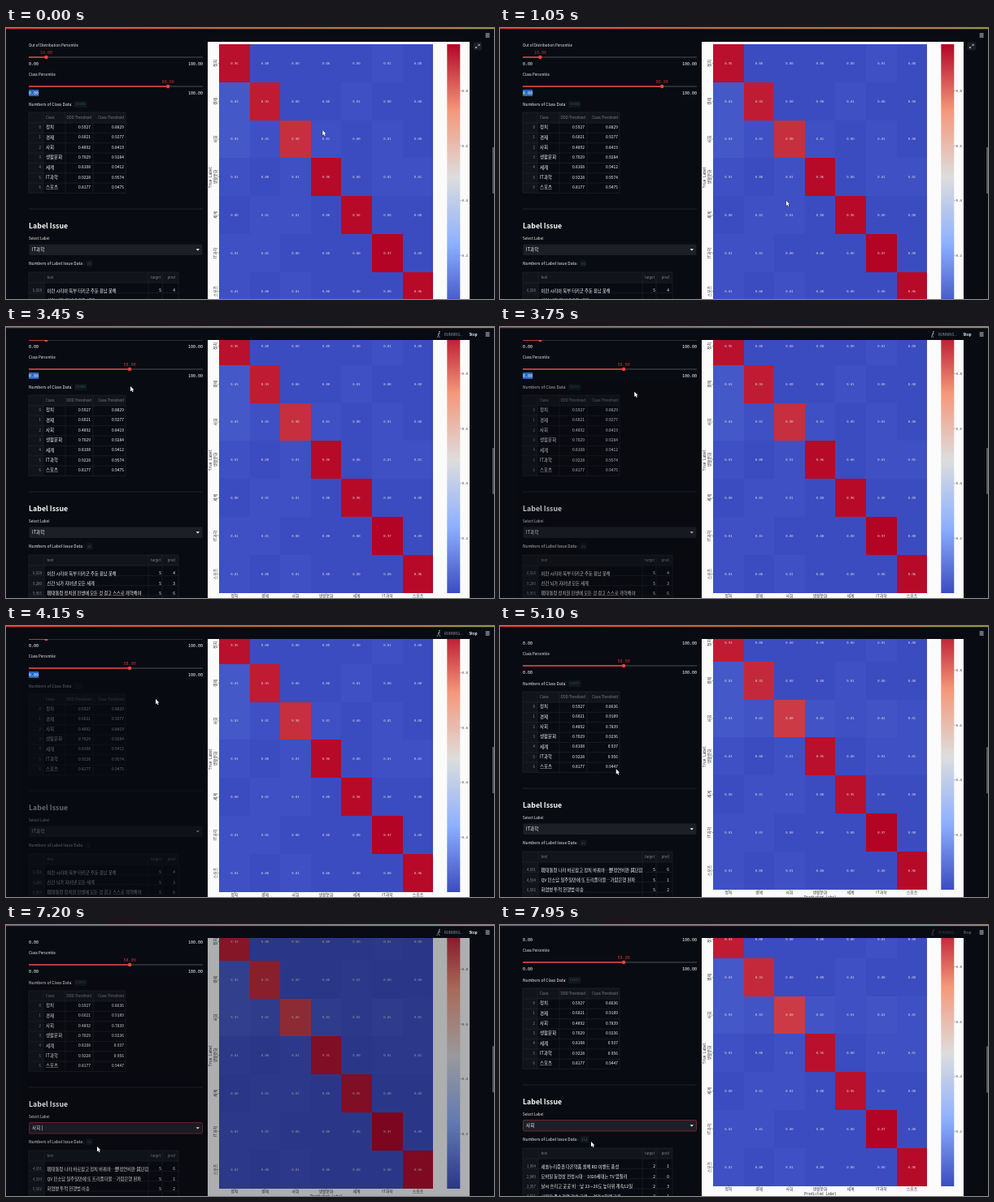
Write an HTML page with a canvas that moves like this. It is 600 by 334 pixels and loops after 8 s.

```html
<!DOCTYPE html>
<html lang="ko">
<head>
<meta charset="utf-8">
<title>Label issue dashboard</title>
<style>
html, body { margin: 0; width: 100%; height: 100%; overflow: hidden; background: #080b11; }
canvas { display: block; width: 600px; height: 334px; }
</style>
</head>
<body>
<canvas id="stage"></canvas>
<script>
const W = 600, H = 334, LOOP = 8000;
const canvas = document.getElementById('stage');
const ctx = canvas.getContext('2d');
const dpr = window.devicePixelRatio || 1;
canvas.width = W * dpr;
canvas.height = H * dpr;

const SANS = '"Noto Sans CJK KR", "Noto Sans CJK", "Noto Sans", sans-serif';
const MONO = '"DejaVu Sans Mono", monospace';
const BG = '#080b11', INK = '#fafafa', GREY = '#85888f', LINE = '#22252d', RED = '#f5423f';
const ROW = 12.35;

// Moments at which the page changes
const AT = { drag: 2300, dropped: 2600, rerun: 2900, updated: 4700, open: 6050, picked: 6600, filtered: 7600 };

// Class name, OOD threshold, class threshold before and after, accuracy before and after
const CLASSES = [
  '정치 0.5927 0.8829 0.8636 .95 .93', '경제 0.6021 0.9277 0.9189 .93 .91',
  '사회 0.4892 0.8419 0.7839 .90 .88', '생활문화 0.7029 0.9284 0.9236 .96 .95',
  '세계 0.8108 0.9412 0.937 .96 .95', 'IT과학 0.9228 0.9574 0.956 .97 .97',
  '스포츠 0.8177 0.9475 0.9447 .96 .96'].map(s => s.split(' '));

const ISSUES = [
  ['6,928|이란 시리아 북부 터키군 주둔 용납 못해|5|4',
   '9,280|신간 뇌가 지어낸 모든 세계|5|3',
   '9,955|現대통령 정치권 민생에 모든 것 걸고 스스로 개혁해야|5|6'],
  ['4,691|現대통령 나라 바로잡고 정치 바꿔야…野정연비판·與단합도 촉구|5|6',
   '4,934|QV 민소담 일주일만에 또 트리플더블…가람은행 완파|5|1',
   '6,502|화염병 투척 현행범 이송|5|2'],
  ['1,994|새솔누리증권 다온약품 올해 RD 이벤트 풍성|2|1',
   '2,049|모바일 동영상 전성시대…1020세대는 TV 앞질러|2|0',
   '2,357|날씨 흐리고 곳곳 비…낮 23∼26도 높더위 계속12일|2|3',
   '4,011|사용자 중소기업 기술 교류 …경기 3회째 교육|2|1']];

// Pointer stops after the opening sweep: time, x, y
const PATH = [[1700, 389, 126], [2200, 197, 75], [2300, 199, 74], [2600, 152, 74], [3450, 153, 73],
  [4150, 184, 90], [5950, 108, 249], [6300, 80, 198], [6600, 74, 178], [7150, 112, 273], [8000, 112, 267]];

const HEAT = ['#3b4cc0', '#8db0fe', '#dddddd', '#f4987a', '#b40426'];

const clamp = (v, a = 0, b = 1) => Math.min(b, Math.max(a, v));
const ramp = (t, a, b) => clamp((t - a) / (b - a));
const mix = (a, b, k) => a + (b - a) * k;
const smooth = k => k * k * (3 - 2 * k);
const noise = n => Math.abs(Math.sin(n * 12.9898) * 43758.5453) % 1;
const channel = (hex, i) => parseInt(hex.substr(1 + i * 2, 2), 16);

function heat(v) {
  const p = clamp(v) * (HEAT.length - 1);
  const i = Math.min(HEAT.length - 2, Math.floor(p));
  return `rgb(${[0, 1, 2].map(c => Math.round(mix(channel(HEAT[i], c), channel(HEAT[i + 1], c), p - i)))})`;
}

// Strong diagonal, faint seeded confusion elsewhere, a little more in the first column
function score(r, c, updated) {
  if (r === c) return +CLASSES[r][updated ? 5 : 4];
  if (c === 0 && (r === 1 || r === 2)) return 0.03;
  return (Math.floor(noise(r * 7 + c + 1) * 1.7) + (updated && r === 2 ? 1 : 0)) / 100;
}

function rect(x, y, w, h, color) {
  ctx.fillStyle = color;
  ctx.fillRect(x, y, w, h);
}

// Fades everything already drawn in an area towards the page colour.
function veil(x, y, w, h, opacity) {
  ctx.globalAlpha = 1 - opacity;
  rect(x, y, w, h, BG);
  ctx.globalAlpha = 1;
}

function box(x, y, w, h, r, fill, edge) {
  ctx.beginPath();
  ctx.roundRect(x, y, w, h, r);
  ctx.fillStyle = fill;
  ctx.fill();
  if (!edge) return;
  ctx.strokeStyle = edge;
  ctx.lineWidth = 0.7;
  ctx.stroke();
}

function stroke(points, color, width) {
  ctx.beginPath();
  points.forEach(([x, y]) => ctx.lineTo(x, y));
  ctx.strokeStyle = color;
  ctx.lineWidth = width;
  ctx.stroke();
}

// Text is set ten times larger and scaled down, so tiny sizes stay accurate.
function text(s, x, y, size, { color = INK, align = 'left', weight = 400, font = SANS, turn = 0 } = {}) {
  ctx.save();
  ctx.translate(x, y);
  ctx.rotate(turn);
  ctx.scale(0.1, 0.1);
  ctx.font = `${weight} ${size * 10}px ${font}`;
  ctx.textAlign = align;
  ctx.fillStyle = color;
  ctx.fillText(s, 0, size * 3.6);
  ctx.restore();
}

function slider(label, y, value, selected) {
  const knob = 28 + 214 * value / 100;
  text(label, 28, y - 14.5, 4.5);
  rect(28, y - 0.7, 214, 1.4, '#3a3d45');
  rect(28, y - 0.7, knob - 28, 1.4, RED);
  ctx.fillStyle = RED;
  ctx.beginPath();
  ctx.arc(knob, y, 2.2, 0, 7);
  ctx.fill();
  text(value.toFixed(2), knob, y - 5.8, 5, { color: '#c03236', align: 'center', font: MONO });
  if (selected) rect(28, y + 4, 12.2, 8, '#2466c4');
  text('0.00', 28, y + 8, 5, { font: MONO });
  text('100.00', 242, y + 8, 5, { align: 'right', font: MONO });
}

function grid(x, y, cols, rows) {
  const w = cols[cols.length - 1], h = 13 + rows * ROW;
  rect(x, y, w, 13, '#11141b');
  rect(x, y, cols[0], h, '#11141b');
  for (const c of [0, ...cols]) stroke([[x + c, y], [x + c, y + h]], LINE, 0.6);
  stroke([[x, y], [x + w, y]], LINE, 0.6);
  for (let i = 0; i <= rows; i++) {
    const ly = y + 13 + i * ROW;
    stroke([[x, ly], [x + w, ly]], LINE, 0.6);
  }
}

function tag(s, x, y) {
  box(x, y - 4, s.length * 2.5 + 3, 8, 1, '#12171c');
  text(s, x + 1.5, y, 4.1, { color: '#23583f', font: MONO });
}

const dim = { color: GREY }, right = { align: 'right' }, dimRight = { ...dim, ...right };

function classTable(updated) {
  grid(28, 104, [18, 45, 79, 119], 7);
  text('Class', 49, 110.5, 4.3, dim);
  text('OOD Threshold', 105, 110.5, 4.3, dimRight);
  text('Class Threshold', 145, 110.5, 4.3, dimRight);
  CLASSES.forEach(([name, ood, before, after], i) => {
    const y = 122.3 + i * ROW;
    text(i, 43, y, 4.4, dimRight);
    text(name, 49, y, 5.5);
    text(ood, 104, y, 4.9, right);
    text(updated ? after : before, 145, y, 4.9, right);
  });
}

function issueTable(rows) {
  grid(28, 301, [19, 147, 164, 184], 4);
  text('text', 50.5, 307, 4.3, dim);
  text('target', 190, 307, 4.3, dimRight);
  text('pred', 208, 307, 4.3, dimRight);
  rows.forEach((row, i) => {
    const [id, title, target, pred] = row.split('|');
    const y = 323.6 + i * ROW;
    text(id, 44, y, 4.4, dimRight);
    ctx.save();
    ctx.beginPath();
    ctx.rect(48, y - 6, 127, 12);
    ctx.clip();
    text(title, 50.5, y, 5.3);
    ctx.restore();
    text(target, 191, y, 4.9, right);
    text(pred, 208, y, 4.9, right);
  });
}

function selectBox(value, active, caret) {
  box(28.5, 266.5, 213, 13.5, 1.5, '#1d1f27', active ? '#93323a' : null);
  text(value, 32, 273.2, 5.6);
  if (caret) rect(44.2, 270, 0.5, 6.4, INK);
  ctx.fillStyle = INK;
  ctx.beginPath();
  ctx.moveTo(233.6, 272.2);
  ctx.lineTo(238, 272.2);
  ctx.lineTo(235.8, 274.6);
  ctx.fill();
}

function matrix(updated) {
  const edgeX = c => Math.round(262 + 37.6 * c), edgeY = r => Math.round(20 + 46.8 * r);
  const ink = '#30323a', left = edgeX(0), top = edgeY(0), bottom = edgeY(7);
  const label = { color: ink, align: 'center' }, upright = { ...label, turn: -Math.PI / 2 };
  rect(248, 17, 322, 345, '#fbfbfb');
  CLASSES.forEach(([name], r) => {
    const y = edgeY(r), h = edgeY(r + 1) - y;
    for (let c = 0; c < 7; c++) {
      const x = edgeX(c), w = edgeX(c + 1) - x, v = score(r, c, updated);
      rect(x, y, w, h, heat(v / 0.97));
      text(v.toFixed(2), x + w / 2, y + h / 2, 3.9, { color: '#dcdce6', align: 'center', font: MONO });
    }
    const midX = (edgeX(r) + edgeX(r + 1)) / 2, midY = y + h / 2;
    stroke([[left - 1.3, midY], [left, midY]], ink, 0.4);
    stroke([[midX, bottom], [midX, bottom + 1.3]], ink, 0.4);
    text(name, 257.5, midY, 4.9, upright);
    text(name, midX, bottom + 3.7, 4.9, label);
  });
  text('True Label', 251.8, 184, 4.4, { ...upright, font: MONO });
  text('Predicted Label', 393.8, bottom + 9.3, 4.4, { ...label, font: MONO });

  const bar = ctx.createLinearGradient(0, bottom, 0, top);
  HEAT.forEach((color, i) => bar.addColorStop(i / (HEAT.length - 1), color));
  rect(542.3, top, 16, bottom - top, bar);
  for (let v = 0.2; v < 0.9; v += 0.2) {
    const y = bottom - v / 0.97 * (bottom - top);
    stroke([[558.3, y], [559.7, y]], ink, 0.4);
    text(v.toFixed(1), 560.6, y, 4, { color: ink, font: MONO });
  }
}

function menu(pointerY) {
  const pitch = 14.15, hover = clamp(Math.floor((pointerY + 5 - 144) / pitch), 0, 6);
  box(28, 144, 214, 99, 1.5, '#0d1016');
  CLASSES.forEach(([name], i) => {
    const y = 151.3 + i * pitch;
    if (i === hover) rect(28, y - 7, 214, pitch, '#1c1f26');
    text(name, 34, y, 5.6);
  });
}

function runner(t) {
  const s = Math.sin(t / 90) * 1.8, tone = '#a4a6ab';
  ctx.fillStyle = tone;
  ctx.beginPath();
  ctx.arc(533, 5.8, 0.9, 0, 7);
  ctx.fill();
  stroke([[532.6, 7.2], [531.6, 10]], tone, 0.9);
  stroke([[532.4 - s, 9.2], [532.4, 7.6], [532.6 + s, 9]], tone, 0.7);
  stroke([[531.4 - s, 13.2], [531.6, 10], [532 + s, 11.4], [531.8 + s, 13.2]], tone, 0.7);
}

function header(t) {
  rect(0, 0, W, 16, BG);
  const line = ctx.createLinearGradient(0, 0, W, 0);
  line.addColorStop(0, '#d63a3a');
  line.addColorStop(1, '#a8974c');
  rect(0, 0, W, 1.2, line);
  for (const y of [7, 9, 11]) rect(589.6, y - 0.4, 5, 0.9, '#dcdde0');
  const first = t >= AT.dropped && t < AT.updated + 200;
  if (!first && t < AT.picked) return;
  runner(t);
  text('RUNNING...', 539, 9, 4.3, { color: '#9b9da3' });
  text('Stop', 569.5, 9, 4.4, { weight: 700 });
  veil(528, 3, 53, 12, 1 - 0.65 * ramp(t, AT.filtered, 7950));
}

function expandButton() {
  box(574.5, 17.5, 10.5, 10, 1.5, '#1b1e25');
  for (const d of [-1, 1]) {
    const x = 579.8 + d * 2.4, y = 22.5 - d * 2.1;
    stroke([[x - d * 1.7, y], [x, y], [x, y + d * 1.7]], '#d4d5d8', 0.7);
    stroke([[x, y], [x - d * 1.9, y + d * 1.7]], '#d4d5d8', 0.7);
  }
}

function pointerAt(t) {
  if (t < PATH[0][0]) {
    const p = t / PATH[0][0] * Math.PI * 2;
    return [389 + 55 * Math.sin(p), 176 - 50 * Math.cos(p)];
  }
  const i = PATH.findIndex(p => p[0] > t);
  const [ta, xa, ya] = PATH[i - 1], [tb, xb, yb] = PATH[i];
  const k = smooth(ramp(t, ta, tb));
  return [mix(xa, xb, k), mix(ya, yb, k)];
}

function pointer(x, y, hand) {
  ctx.save();
  ctx.translate(x, y);
  ctx.beginPath();
  if (hand) {
    ctx.roundRect(-0.7, 0, 1.5, 6, 0.7);
    ctx.roundRect(-1.6, 3.4, 4.6, 4.6, 1.2);
  } else {
    [[0, 0], [0, 6.3], [1.5, 5], [2.5, 7.2], [3.5, 6.7], [2.5, 4.6], [4.4, 4.5]].forEach(p => ctx.lineTo(...p));
    ctx.closePath();
  }
  ctx.fillStyle = '#fff';
  ctx.strokeStyle = '#111';
  ctx.lineWidth = 0.9;
  ctx.stroke();
  ctx.fill();
  ctx.restore();
}

function draw(t) {
  const updated = t >= AT.updated, picked = t >= AT.picked, filtered = t >= AT.filtered;
  const scroll = t < AT.rerun ? 0 : !updated ? 20 : !filtered ? 23 : 26;
  const percentile = Math.round(mix(80, 58, smooth(ramp(t, AT.drag, AT.dropped))));
  const waiting = !updated && t > 3800;
  const leftOpacity = filtered ? 1 : updated ? mix(1, 0.4, ramp(t, 7050, 7650)) : mix(1, 0.38, ramp(t, 3450, 4150));
  const plotOpacity = filtered ? 1 : mix(1, 0.36, ramp(t, 6900, 7500));
  const [px, py] = pointerAt(t);

  ctx.setTransform(dpr, 0, 0, dpr, 0, 0);
  rect(0, 0, W, H, BG);

  ctx.save();
  ctx.translate(0, -scroll);
  slider('Out of Distribution Percentile', 36, 10, false);
  slider('Class Percentile', 72, percentile, !updated);
  text('Numbers of Class Data:', 28, 94, 5);
  tag(waiting ? '...' : updated ? '11037' : '10384', 84, 94);
  classTable(updated);
  rect(28, 222.7, 214, 0.7, '#2a2d35');
  text('Label Issue', 28, 244, 8.8, { weight: 700 });
  text('Select Label', 28, 259.5, 4.5);
  selectBox(picked ? '사회' : 'IT과학', t >= AT.open, picked && t < 7450);
  text('Numbers of Label Issue Data :', 28, 290.3, 5);
  tag(waiting ? '.' : filtered ? '164' : updated ? '81' : '46', 98.5, 290.3);
  issueTable(ISSUES[filtered ? 2 : updated ? 1 : 0]);
  veil(20, 87, 227, 290, leftOpacity);
  matrix(updated);
  veil(248, 16, 322, 350, plotOpacity);
  ctx.restore();

  if (t >= AT.open && !picked) menu(py);
  header(t);
  if (t < AT.drag) expandButton();
  rect(598, 147 + scroll * 0.1, 2, 57, '#55585d');
  pointer(px, py, t >= 5950 && t < 6750);
}

const start = performance.now();
function tick() {
  draw((performance.now() - start) % LOOP);
  requestAnimationFrame(tick);
}
tick();
</script>
</body>
</html>
```
